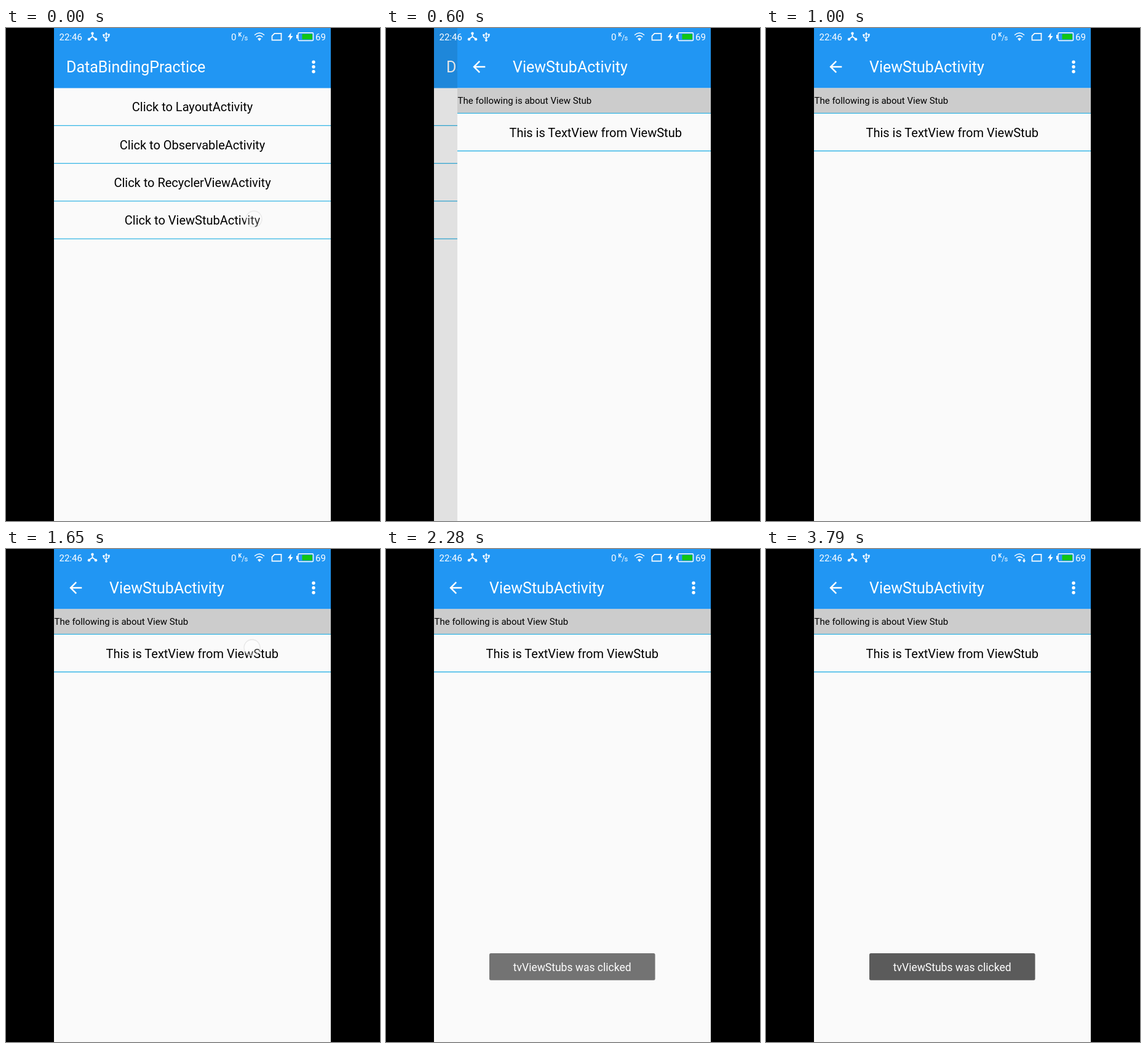
An HTML page for the animation above (4150 ms loop, 608 by 800 pixels).

```html
<!DOCTYPE html>
<html lang="en">
<head>
<meta charset="utf-8">
<style>
  html, body { margin: 0; width: 100%; height: 100%; overflow: hidden; background: #000; }
  svg { display: block; width: 100vw; height: 100vh; }
  text { font-family: Roboto, sans-serif; font-size: 20px; fill: #000; }
  .title { font-size: 25px; fill: #fff; }
  .status text { font-size: 15px; fill: #fff; }
  .mid { text-anchor: middle; }
  .ink { fill: #fff; }
  .line { fill: none; stroke: #fff; stroke-width: 1.7; }
  .rule { stroke: #33b5e5; stroke-width: 1.3; }
</style>
</head>
<body>
<svg viewBox="0 0 608 800">
  <defs>
    <clipPath id="screen"><rect x="78" width="450" height="800"/></clipPath>
    <g id="base">
      <rect width="450" height="800" fill="#fafafa"/>
      <rect width="450" height="97.5" fill="#2196f3"/>
      <g class="ink">
        <circle cx="422" cy="55.3" r="2.7"/>
        <circle cx="422" cy="63" r="2.7"/>
        <circle cx="422" cy="70.7" r="2.7"/>
      </g>
    </g>
  </defs>
  <rect width="608" height="800"/>
  <g clip-path="url(#screen)">
    <g id="home" transform="translate(78 0)">
      <use href="#base"/>
      <text class="title" x="20" y="72">DataBindingPractice</text>
    </g>
    <rect id="dim" x="78" width="450" height="800" opacity="0"/>
    <g id="detail">
      <use href="#base"/>
      <path class="ink" transform="translate(20.3 48) scale(1.25)"
        d="M20 11H7.83l5.59-5.59L12 4l-8 8 8 8 1.41-1.41L7.83 13H20z"/>
      <text class="title" x="90" y="72">ViewStubActivity</text>
      <rect y="97.5" width="450" height="40.5" fill="#ccc"/>
      <text x="0.5" y="123" style="font-size:15px">The following is about View Stub</text>
      <text class="mid" x="224.7" y="176.5">This is TextView from ViewStub</text>
      <path class="rule" d="M0 138.4H450M0 199.5H450"/>
    </g>
    <g class="status">
      <text x="86.5" y="19.5">22:46</text>
      <path class="line" d="M140.5 8V14L134 18.5M140.5 14L147 18.5"/>
      <g class="ink">
        <circle cx="140.5" cy="8.8" r="2.2"/>
        <circle cx="135" cy="18.3" r="2.2"/>
        <circle cx="146" cy="18.3" r="2.2"/>
      </g>
      <path class="line" style="stroke-width:1.4" d="M163 9V20M158.8 11.5V14.5L163 17.5M167.2 11V14L163 16.5"/>
      <path class="ink" d="M160.5 10.5L163 6.5L165.5 10.5ZM157.3 10h3v3h-3zM165.7 9.5h3v3h-3z"/>
      <circle class="ink" cx="163" cy="20" r="1.9"/>
      <text x="366" y="19.5">0</text>
      <text x="377.5" y="14" style="font-size:9px;font-weight:700">K</text>
      <text x="383" y="19.5" style="font-size:12px">/</text>
      <text x="387.5" y="19.5" style="font-size:11px">s</text>
      <path class="line" style="stroke-width:1.5" d="M404 11.5Q412 4.5 420 11.5M406.8 14.8Q412 10 417.2 14.8"/>
      <path class="ink" d="M409 17.5Q412 14.8 415 17.5L412 21Z"/>
      <g id="traffic">
        <path d="M416.5 14.5h7v8h-7z" fill="#2196f3"/>
        <path class="ink" d="M418.5 15.5h2v3h1.8l-2.8 3.5l-2.8-3.5h1.8z"/>
      </g>
      <path class="line" d="M436.5 8.8H447.5V19.7H432.5V12.8Z"/>
      <path class="ink" d="M463.5 7.5L458 15H461.5L460.5 21L466.5 13H463Z"/>
      <rect class="ink" x="472" y="11" width="2.5" height="6"/>
      <rect class="line" style="stroke-width:1.4" x="475" y="7.7" width="24.5" height="12.8" rx="1.5"/>
      <rect x="481.5" y="9.7" width="16.3" height="8.8" fill="#12c512"/>
      <text x="503" y="19.5">69</text>
    </g>
    <g id="toast">
      <rect x="168" y="656" width="269.5" height="43.7" rx="2.5" fill="#5b5b5b"/>
      <text class="mid" x="302.7" y="685" style="font-size:17.5px;fill:#fff">tvViewStubs was clicked</text>
    </g>
    <circle id="touch" r="13" fill="#fff" fill-opacity=".3" stroke="#e2e2e2" stroke-width="1.3"/>
  </g>
</svg>
<script>
  const LOOP = 4150;
  const HOLDS = [[460, 560], [600, 700], [2000, 2100]];
  const el = id => document.getElementById(id);
  const ramp = (t, from, to) => Math.min(1, Math.max(0, (t - from) / (to - from)));

  ['Layout', 'Observable', 'RecyclerView', 'ViewStub'].forEach((name, i) => {
    const y = 61.25 * i;
    el('home').insertAdjacentHTML('beforeend',
      `<text class="mid" x="225" y="${135.3 + y}">Click to ${name}Activity</text>
       <path class="rule" d="M0 ${158.3 + y}H450"/>`);
  });

  function draw(time) {
    const hold = HOLDS.find(([a, b]) => time >= a && time < b);
    const t = hold ? hold[0] : time;

    const x = 78 + Math.round(450 * (1 - ramp(t, 320.5, 1037.5)) ** 5);
    el('detail').setAttribute('transform', `translate(${x} 0)`);
    el('dim').setAttribute('opacity', 0.1 * ramp(t, 420, 600));

    el('toast').setAttribute('opacity', 1 - (1 - ramp(t, 1940, 2500)) ** 2);
    el('traffic').setAttribute('visibility', t < 3790 ? 'hidden' : 'visible');

    const second = t >= 1550;
    el('touch').setAttribute('transform', second ? 'translate(400 160)' : 'translate(403 310)');
    el('touch').setAttribute('opacity',
      second ? 0.8 - 0.8 * ramp(t, 1780, 2120) : 0.7 - 0.7 * ramp(t, 0, 120));
  }

  const start = performance.now();
  function tick() {
    draw((performance.now() - start) % LOOP);
    requestAnimationFrame(tick);
  }
  tick();
</script>
</body>
</html>
```
